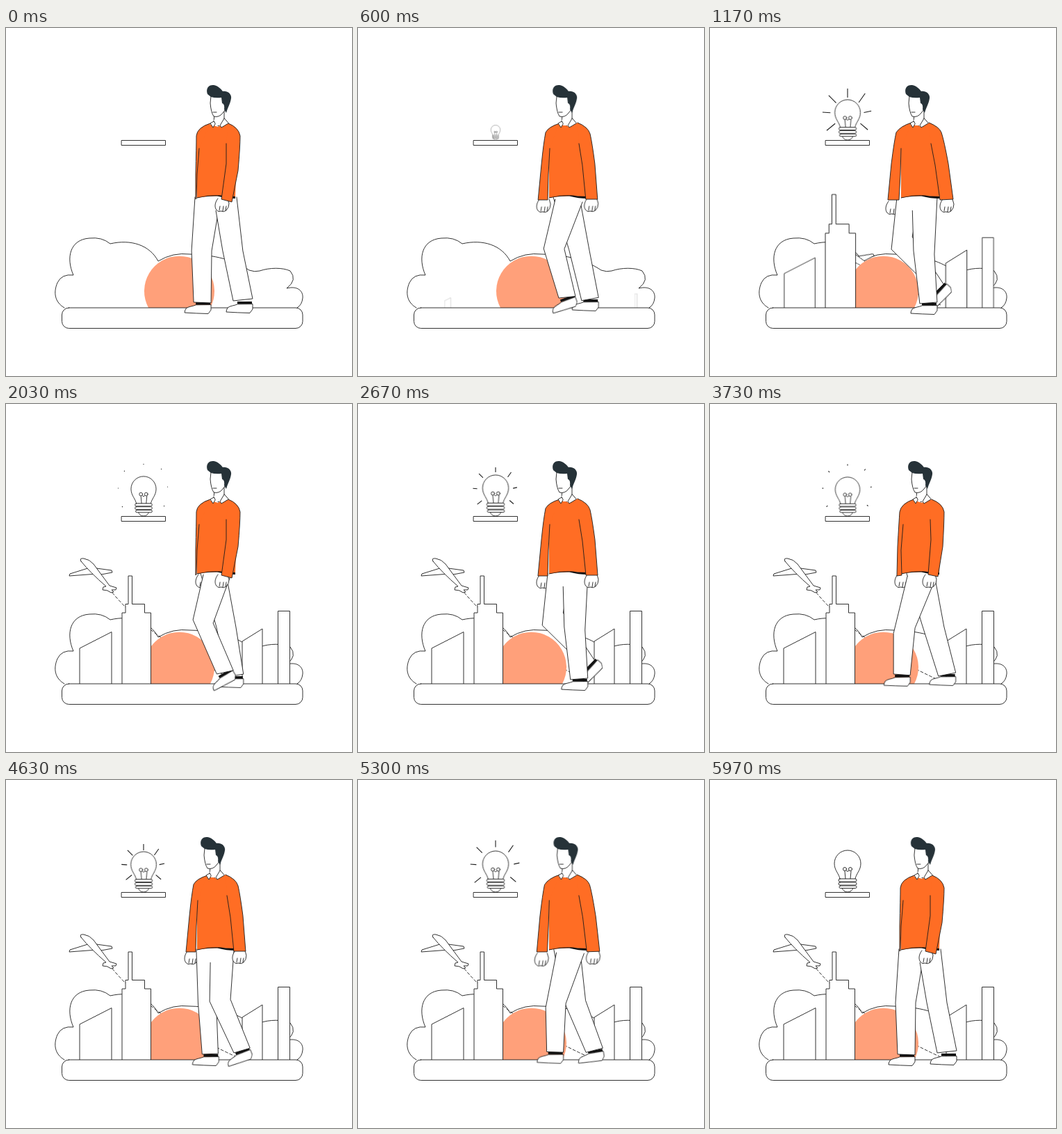
Animation of 498 by 500 pixels, one loop 6010 ms. Source, as an HTML page without scripts:

```html
<!DOCTYPE html>
<html lang="en">
<head>
<meta charset="utf-8">
<title>Walking man</title>
<style>
html, body { margin: 0; width: 100%; height: 100%; overflow: hidden; background: #fff; }
svg { display: block; width: 498px; height: 500px; }
svg { --loop: 6.01s; --walk: 1.5025s; --sway: 2.00333s; }
.ink { fill: #fff; stroke: #1c1c1c; stroke-width: .9; stroke-linejoin: round; stroke-linecap: round; }
.line { fill: none; }
.knit { fill: #ff6d24; }
.sun { fill: #ffa07a; }
.dark { fill: #263238; }

/* scenery */
.a, .b, .bulb, .plane, .reveal, .ray { animation: var(--loop) linear infinite; }
.a { animation-name: rise-a; }
.b { animation-name: rise-b; }
@keyframes rise-a {
  0%, 9.2% { transform: scale(0); }
  13.3% { transform: scale(1); }
  15% { transform: scale(1.09); }
  19.5% { transform: scale(.965); }
  24.1% { transform: scale(1.015); }
  29%, 100% { transform: scale(1); }
}
@keyframes rise-b {
  0%, 11.6% { transform: scale(0); }
  15.8% { transform: scale(1); }
  17.6% { transform: scale(1.09); }
  19.5% { transform: scale(1.05); }
  22% { transform: scale(.965); }
  26.6% { transform: scale(1.015); }
  31%, 100% { transform: scale(1); }
}
.bulb { animation-name: bulb; transform-origin: 198px 161px; }
@keyframes bulb {
  0%, 8.3% { transform: scale(0); }
  13.3% { transform: scale(1.05); }
  19.5% { transform: scale(.967); }
  33.8% { transform: scale(.95); }
  44.4% { transform: scale(.983); }
  62.1% { transform: scale(.933); }
  77% { transform: scale(.967); }
  99.3%, 100% { transform: scale(1); }
}
.ray { animation-name: ray; fill: none; stroke: #1c1c1c; stroke-width: 1.1; }
@keyframes ray {
  0%, 13% { stroke-dasharray: 0 60; stroke-dashoffset: 0; }
  19.5% { stroke-dasharray: 13 60; stroke-dashoffset: -3; }
  33.8% { stroke-dasharray: 1 60; stroke-dashoffset: -16; }
  34.3% { stroke-dasharray: 0 60; stroke-dashoffset: -17; }
  38.3% { stroke-dasharray: 0 60; stroke-dashoffset: 0; }
  44.4% { stroke-dasharray: 7 60; stroke-dashoffset: -5; }
  52.7% { stroke-dasharray: 10 60; stroke-dashoffset: -6; }
  62.1% { stroke-dasharray: 2 60; stroke-dashoffset: -14.5; }
  65% { stroke-dasharray: 0 60; stroke-dashoffset: -17; }
  71.5% { stroke-dasharray: 0 60; stroke-dashoffset: 0; }
  77% { stroke-dasharray: 9 60; stroke-dashoffset: -2; }
  86% { stroke-dasharray: 12 60; stroke-dashoffset: -4; }
  97% { stroke-dasharray: 1 60; stroke-dashoffset: -16; }
  98.5%, 100% { stroke-dasharray: 0 60; stroke-dashoffset: -17; }
}
.plane { animation-name: fly; transform-origin: 152px 272px; }
@keyframes fly {
  0%, 11.6% { transform: translate(180px, 126px) rotate(-25deg) scale(0); }
  14% { transform: translate(150px, 115px) rotate(-22deg) scale(1); }
  19.5% { transform: translate(92px, 84px) rotate(-17deg) scale(1); }
  25% { transform: translate(35px, 36px) rotate(-7deg) scale(1); }
  32.1%, 100% { transform: translate(0, 0) rotate(0deg) scale(1); }
}
.reveal { animation-name: reveal; fill: none; stroke: #fff; stroke-width: 8; stroke-dasharray: 1 2; }
@keyframes reveal {
  0%, 11.6% { stroke-dashoffset: 1; }
  19.5% { stroke-dashoffset: .54; }
  25% { stroke-dashoffset: .22; }
  32.1%, 100% { stroke-dashoffset: 0; }
}

/* legs */
.legs { animation: drift var(--loop) ease-in-out infinite; }
@keyframes drift { 0%, 10%, 33.8%, 100% { transform: none; } 19.5% { transform: translateX(-4px); } }
.far-leg, .near-leg, .far-shoe, .near-shoe { animation: var(--walk) linear infinite; }
.far-leg { animation-name: far-leg; }
.near-leg { animation-name: near-leg; }
.far-shoe { animation-name: far-shoe; }
.near-shoe { animation-name: near-shoe; }
@keyframes far-leg {
  0%, 97.3%, 100% { d: path("M272,243 L267,320 L270,394 L295,395 L296,320 L308,250"); }
  8.7% { d: path("M274,243 L277,320 L283,394 L306,393 L303,320 L305,250"); }
  28% { d: path("M276,243 L290,320 L304,397 L329,395 L322,320 L312,250"); }
  35.3% { d: path("M280,243 L303,320 L318,392 L342,388 L331,320 L318,250"); }
  48.7% { d: path("M283,243 L305,316 L329,391 L354,386 L337,320 L324,250"); }
  58.7% { d: path("M280,243 L283,318 L327,392 L350,384 L314,312 L315,250"); }
  70% { d: path("M275,243 L272,318 L336,381 L347,364 L305,300 L310,250"); }
  78% { d: path("M273,243 L265,318 L328,380 L340,368 L295,300 L305,250"); }
  85.3% { d: path("M272,243 L262,312 L296,390 L320,383 L292,312 L305,250"); }
}
@keyframes near-leg {
  0%, 97.3%, 100% { d: path("M300,250 L312,320 L327,392 L355,389 L341,320 L332,243"); }
  8.7% { d: path("M294,250 L292,318 L328,392 L351,385 L322,315 L328,243"); }
  20% { d: path("M292,250 L282,312 L331,382 L346,366 L316,302 L328,243"); }
  28% { d: path("M288,250 L276,314 L322,385 L337,372 L306,308 L326,243"); }
  35.3% { d: path("M284,245 L269,310 L303,388 L327,383 L298,315 L322,250"); }
  48.7% { d: path("M284,248 L264,330 L263,388 L287,390 L295,322 L325,250"); }
  58.7% { d: path("M288,248 L279,322 L284,394 L308,393 L305,320 L326,248"); }
  78% { d: path("M295,250 L297,320 L306,396 L331,394 L327,325 L331,243"); }
  85.3% { d: path("M298,250 L304,320 L318,393 L344,390 L333,320 L330,243"); }
}
@keyframes far-shoe {
  0%, 97.3%, 100% { transform: translate(283px, 394px) rotate(0deg); }
  8.7% { transform: translate(295px, 394px) rotate(0deg); }
  28% { transform: translate(317px, 395px) rotate(0deg); }
  35.3% { transform: translate(330px, 391px) rotate(0deg); }
  48.7% { transform: translate(342px, 388px) rotate(0deg); }
  58.7% { transform: translate(339px, 388px) rotate(-22deg); }
  70% { transform: translate(342px, 372px) rotate(-55deg); }
  78% { transform: translate(334px, 374px) rotate(-47deg); }
  85.3% { transform: translate(308px, 386px) rotate(-28deg); }
}
@keyframes near-shoe {
  0%, 97.3%, 100% { transform: translate(343px, 393px) rotate(0deg); }
  8.7% { transform: translate(339px, 388px) rotate(-22deg); }
  20% { transform: translate(338px, 374px) rotate(-48deg); }
  28% { transform: translate(329px, 378px) rotate(-45deg); }
  35.3% { transform: translate(314px, 386px) rotate(-30deg); }
  48.7% { transform: translate(275px, 389px) rotate(0deg); }
  58.7% { transform: translate(296px, 393px) rotate(0deg); }
  78% { transform: translate(319px, 395px) rotate(0deg); }
  85.3% { transform: translate(331px, 392px) rotate(0deg); }
}

/* upper body */
.head, .collar, .arm-l, .arm-r, .hand-l, .hand-r { animation: var(--sway) ease-in-out infinite; }
.head { animation-name: head; }
.collar { animation-name: collar; }
.arm-l { animation-name: arm-l; }
.arm-r { animation-name: arm-r; }
.hand-l { animation-name: hand-l; }
.hand-r { animation-name: hand-r; }
@keyframes head {
  0%, 100% { transform: none; }
  32.5% { transform: translate(-9px, 0); }
  58.5% { transform: translate(-8px, 0); }
  86.5% { transform: translate(-4px, 0); }
}
@keyframes collar {
  0%, 100% { transform: none; }
  32.5%, 58.5% { transform: translate(-6px, 0); }
  86.5% { transform: translate(-2px, 0); }
}
@keyframes arm-l {
  0%, 97%, 100% { d: path("M278,173 L275,210 L274,245 L273,246 L273,210 Q274,170 274,155 Q275,143 294,137"); }
  32.5% { d: path("M276,173 L274,210 L273,247 L259,247 L264,195 Q267,165 270,150 Q274,142 290,137"); }
  58.5% { d: path("M275,173 L274,210 L272,247 L256,247 L261,195 Q265,163 268,150 Q274,141 290,136"); }
  86.5% { d: path("M278,173 L275,210 L276,246 L269,247 L270,205 Q272,170 273,155 Q275,143 293,137"); }
}
@keyframes arm-r {
  0%, 97%, 100% { d: path("M317,166 L317,195 L310,246 L325,250 L334,205 Q337,170 337,155 Q335,143 320,137"); }
  32.5% { d: path("M318,166 L323,197 L328,246 L345,246 L341,195 Q337,165 334,152 Q331,142 316,136"); }
  58.5% { d: path("M318,166 L324,197 L331,247 L350,246 L343,195 Q337,162 333,150 Q330,142 315,136"); }
  86.5% { d: path("M317,166 L318,195 L314,245 L328,248 L335,205 Q337,170 337,155 Q335,143 319,137"); }
}
@keyframes hand-l {
  0%, 97%, 100% { transform: translate(283px, 254px); }
  32.5% { transform: translate(267px, 255px); }
  58.5% { transform: translate(263px, 258px); }
  86.5% { transform: translate(276px, 254px); }
}
@keyframes hand-r {
  0%, 97%, 100% { transform: translate(311px, 254px); }
  32.5% { transform: translate(336px, 254px); }
  58.5% { transform: translate(341px, 255px); }
  86.5% { transform: translate(316px, 254px); }
}
</style>
</head>
<body>
<svg viewBox="0 0 498 500">
  <defs>
    <g id="shoe">
      <path class="ink" d="M-10,4 C-14,6 -21,6 -24,9 Q-26,12 -26,15 Q-10,16 8,16.500 L12,11 V4 Z"/>
      <path d="M-10,0 H11 V3.500 H-10 Z" fill="#111"/>
    </g>
    <g id="hand" class="ink">
      <path d="M-6,-9 C-10,-4 -11,2 -9,6 Q-6,11 -2,9 Q3,11 6,8 Q10,4 10,-2 L8,-9"/>
      <path class="line" d="M-4,8 L-3,2 M1,9 L2,2 M5,8 L6,2"/>
    </g>
    <path id="route" d="M332,398 Q215,345 152,270"/>
    <mask id="flown" maskUnits="userSpaceOnUse" x="0" y="0" width="498" height="500">
      <path class="reveal" pathLength="1" d="M332,398 Q215,345 152,270"/>
    </mask>
  </defs>

  <path class="ink" d="M84,402 C70,394 68,380 74,366 Q80,353 97,355 C86,330 92,304 120,302 Q138,300 150,310 C180,303 207,312 219,335 Q240,322 265,325 C310,326 335,338 350,348 Q358,351 365,349 C380,344 398,344 409,349 Q420,362 404,374 C420,370 428,378 427,388 Q426,398 419,402"/>

  <g mask="url(#flown)"><use href="#route" class="ink line" stroke-dasharray="4 3"/></g>
  <g class="plane ink">
    <path d="M121,235 L92,244 L91,247 L131,244 Z M130,236 L152,239 L153,242 L137,245 Z"/>
    <path d="M108,226 Q105,221 112,222 Q120,223 126,230 L149,261 L159,264 L158,267 L152,267 L155,270 L151,271 L146,268 L139,267 L140,263 L144,262 Q122,243 108,226 Z"/>
  </g>

  <path class="sun" d="M205,402 A50.5,50.5 0 1 1 294,402 Z"/>

  <g class="ink">
    <path class="a" style="transform-origin:129px 402px" d="M106,402 V351 L152,327.500 V402"/>
    <path class="b" style="transform-origin:187.500px 402px" d="M167,402 V300 H172 V287.500 H176 V247 H181.500 V287.500 H199.500 V300 H208.500 V402"/>
    <path class="b" style="transform-origin:354.500px 402px" d="M340,402 V341 L369,323 V402"/>
    <path class="a" style="transform-origin:400px 402px" d="M391.500,402 V297.500 H408.500 V402"/>
    <rect x="80.500" y="402" width="346.500" height="29.500" rx="10"/>
    <rect x="166.500" y="161.500" width="63" height="7"/>
  </g>

  <g class="bulb ink">
    <path d="M187,142 C186,135 179,130 179,120 A19,19 0 0 1 217,120 C217,130 210,135 209,142 Z"/>
    <path class="line" d="M195,142 L194,131 M202,142 L203,131 M196,130 Q198,133 200,130"/>
    <circle class="line" cx="194" cy="128" r="2.500"/>
    <circle class="line" cx="202" cy="128" r="2.500"/>
    <path d="M190,155 Q192,161 198,161 Q204,161 206,155 Z"/>
    <rect x="185" y="142" width="26" height="4" rx="2"/>
    <rect x="185" y="147" width="26" height="4" rx="2"/>
    <rect x="186" y="152" width="25" height="3.500" rx="1.700"/>
  </g>
  <g>
    <path class="ray" pathLength="17" d="M198,103 V86"/>
    <path class="ray" pathLength="17" d="M184,110 L170,96"/>
    <path class="ray" pathLength="17" d="M212,110 L224,93"/>
    <path class="ray" pathLength="17" d="M176,122 L161,121"/>
    <path class="ray" pathLength="17" d="M219,122 L233,119"/>
    <path class="ray" pathLength="17" d="M183,135 L167,148"/>
    <path class="ray" pathLength="17" d="M214,135 L228,147"/>
  </g>

  <g class="hand-l"><use href="#hand"/></g>
  <g class="legs">
    <g class="far-shoe"><use href="#shoe"/></g>
    <path class="far-leg ink" d="M272,243 L267,320 L270,394 L295,395 L296,320 L308,250"/>
    <g class="near-shoe"><use href="#shoe"/></g>
    <path class="near-leg ink" d="M300,250 L312,320 L327,392 L355,389 L341,320 L332,243"/>
  </g>
  <rect x="286" y="242" width="31" height="20" fill="#fff"/>

  <g class="collar ink"><path d="M300,122 L299,136 L306,141 L314,132 V116"/></g>
  <path class="knit" d="M292,138 Q279,143 275,153 V244 Q302,239 330,243 L333,153 Q329,142 316,136 L305,142 Z"/>
  <path d="M275,243.500 Q300,238 316,241.500 L330,242 V245 Q318,245 304,241.500 Q288,241 275,244.500 Z" fill="#111"/>
  <g class="hand-r"><use href="#hand"/></g>
  <path class="arm-l ink knit" d="M278,173 L275,210 L274,245 L273,246 L273,210 Q274,170 274,155 Q275,143 294,137"/>
  <path class="arm-r ink knit" d="M317,166 L317,195 L310,246 L325,250 L334,205 Q337,170 337,155 Q335,143 320,137"/>

  <g class="collar ink">
    <path stroke="none" d="M299,132 L314,130 L309,140 H301 Z"/>
    <path d="M299,134 L294,137 L298,143 L301,138 Z M314,130 L308,140 L310,143 L320,137 Z"/>
  </g>
  <g class="head">
    <path class="ink" d="M295,98 L294,108 Q295,121 299,127 Q307,129 312,122 L316,117 V97 Z"/>
    <path class="ink line" d="M298,121 H303"/>
    <path class="dark" d="M290,95 C287,87 292,81 299,82 C305,83 309,87 312,91 C319,90 325,95 324,101 C323,109 319,114 317,122 L314,117 Q315,109 311,108 L310,100 Q301,101 295,99 Z"/>
  </g>
</svg>
</body>
</html>
```
